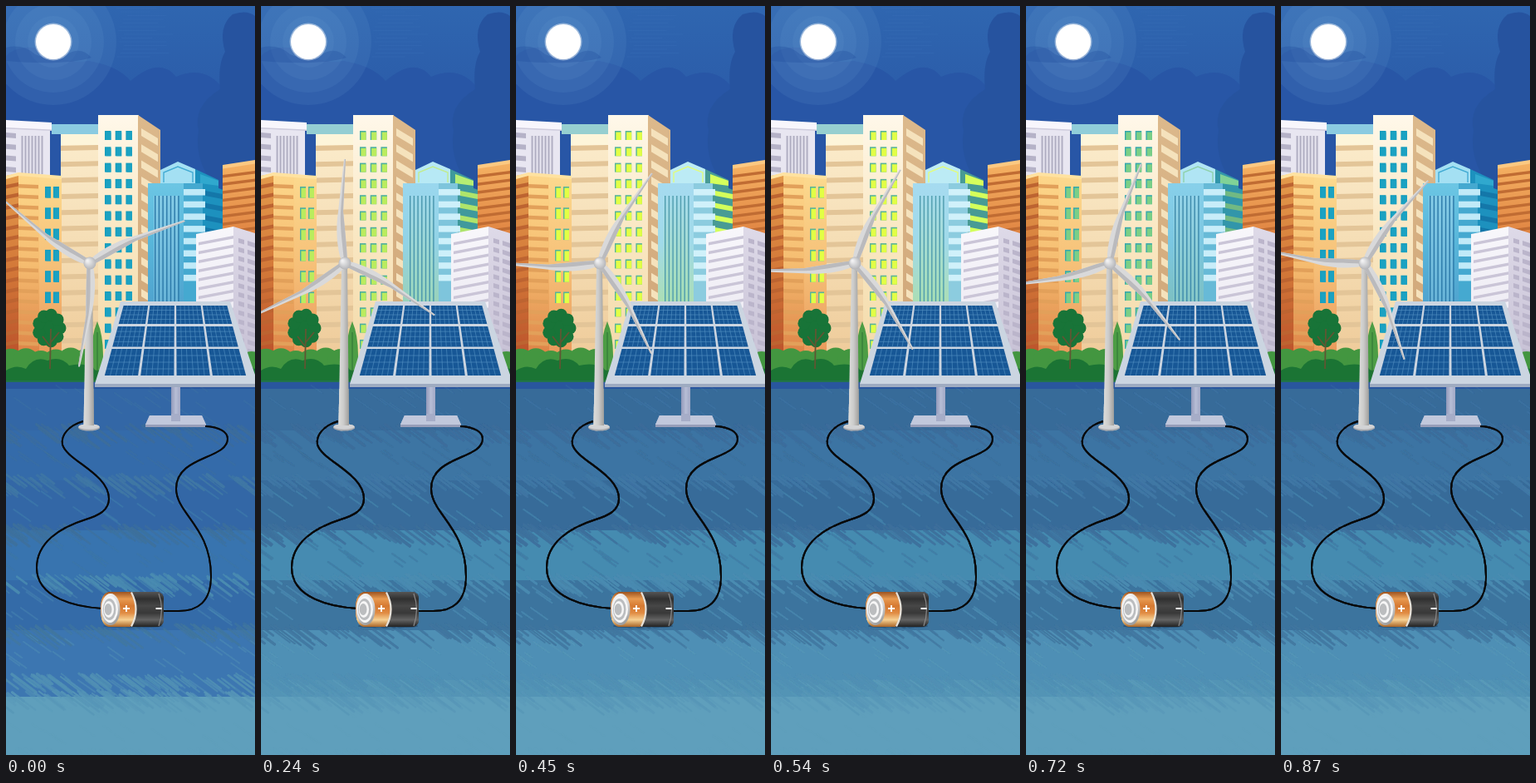
Animation of 300 by 900 pixels, one loop 900 ms. Source, as an HTML page with a canvas:

```html
<!DOCTYPE html>
<html lang="en">
<head>
<meta charset="utf-8">
<title>City power</title>
<style>
html, body { margin: 0; width: 100%; height: 100%; overflow: hidden; background: #2f64ae; }
canvas { display: block; }
</style>
</head>
<body>
<canvas id="stage" width="300" height="900"></canvas>
<script>
const W = 300, H = 900, LOOP = 900, STEP = 30;
const stage = document.getElementById('stage').getContext('2d');
let c = stage;

let seed = 11;
const rnd = () => (seed = (seed * 16807) % 2147483647) / 2147483647;
const lerp = (a, b, k) => a + (b - a) * k;
const clamp = v => Math.min(1, Math.max(0, v));
const times = (n, fn) => { for (let i = 0; i < n; i++) fn(i); };

// Blend two #rrggbb colours
function mix(a, b, k) {
  const part = (s, i) => parseInt(s.substr(1 + i * 2, 2), 16);
  return `rgb(${[0, 1, 2].map(i => Math.round(lerp(part(a, i), part(b, i), k)))})`;
}
function layer(draw) {
  const cv = document.createElement('canvas');
  cv.width = W; cv.height = H;
  c = cv.getContext('2d');
  draw();
  c = stage;
  return cv;
}
function grad(x0, y0, x1, y1, ...cols) {
  const g = c.createLinearGradient(x0, y0, x1, y1);
  cols.forEach((col, i) => g.addColorStop(i / (cols.length - 1), col));
  return g;
}
const vgrad = (y0, y1, ...cols) => grad(0, y0, 0, y1, ...cols);
function rect(x, y, w, h, fill) { c.fillStyle = fill; c.fillRect(x, y, w, h); }
function path(d, fill) { c.fillStyle = fill; c.fill(new Path2D(d)); }
function line(d, col, w) { c.strokeStyle = col; c.lineWidth = w; c.stroke(new Path2D(d)); }
function oval(x, y, rx, ry, fill) {
  c.beginPath();
  c.ellipse(x, y, rx, ry, 0, 0, 7);
  c.fillStyle = fill;
  c.fill();
}
// Upright wall or band with a sloping top and bottom
function slab(x0, x1, y0, y1, h, fill) {
  path(`M${x0} ${y0}L${x1} ${y1}v${h}L${x0} ${y0 + h}Z`, fill);
}
function bands(x0, x1, y0, y1, n, pitch, h, fill) {
  times(n, i => slab(x0, x1, y0 + i * pitch, y1 + i * pitch, h, fill));
}

function sky() {
  rect(0, 0, W, 460, vgrad(0, 220, '#2f66b0', '#2b5ca9', '#24509f'));
  path('M0 60Q15 45 45 52Q70 70 100 66Q135 72 150 90Q185 60 205 85Q240 70 262 100L300 90V230H0Z', '#2856a6');
  path('M262 230Q225 190 232 150Q225 120 258 100Q255 70 264 55Q255 25 273 10Q290 4 300 12V230Z', '#26539f');
  times(14, i => rect(133 + rnd() * 15, 2 + i * 4.5, 35 + rnd() * 30, 1, '#3a70b655'));
  times(4, i => oval(57, 43, 76 - i * 15, 76 - i * 15, '#6aa0d222'));
  path('M0 50Q20 45 35 58Q52 66 74 58Q90 48 103 62Q70 72 0 66Z', '#234f9d55');
  oval(57, 43, 22.5, 22.5, '#ffffff70');
  oval(57, 43, 21, 21, '#fff');
}

function whiteLeft() {
  rect(0, 146, 53, 60, '#e8e6f1');
  bands(0, 12, 152, 153, 4, 13.7, 6, '#b5b2c7');
  times(7, i => rect(18.5 + i * 4, 156, 2, 46, '#b0aec2'));
  slab(0, 55, 137, 140, 9.5, '#f8f6fc');
  slab(0, 55, 146, 148.5, 1.5, '#cecbdc');
}

function creamTower() {
  rect(66, 154, 46, 290, vgrad(154, 430, '#fbeccc', '#f5ddb4', '#eeca98'));
  rect(66, 154, 45, 13, '#fdf5da');
  bands(66, 111, 168, 167, 14, 19.3, 6, '#e3c598');
  rect(111, 131, 49, 300, vgrad(131, 400, '#fff8ea', '#fae8c4', '#f4dcad'));
  slab(159, 186, 131, 149, 270, vgrad(131, 350, '#dcb98c', '#d2aa7c'));
  bands(163, 183, 147, 159, 12, 19.3, 9, '#f5e2bc');
}

function orangeLeft() {
  slab(0, 16, 204, 201, 240, vgrad(204, 430, '#e39a4c', '#d37838', '#b94f2a'));
  rect(15, 202, 26, 240, vgrad(202, 420, '#fdd78b', '#f5bc70', '#dd8246'));
  rect(40, 204, 27, 240, vgrad(204, 420, '#fcd98e', '#f6c078', '#e9985a'));
  bands(0, 15, 215, 212, 17, 12.6, 4.5, '#bd6431');
  bands(15, 39, 214, 215, 17, 12.6, 4.5, '#e2a05a');
  slab(0, 15, 204, 200, 4, '#ffe2a0');
  slab(15, 67, 200, 204, 4, '#ffe2a0');
}

function orangeRight() {
  slab(261, 300, 192, 186, 100, vgrad(188, 280, '#f5b263', '#df8140'));
  bands(261, 300, 203, 198, 9, 9.6, 3.5, '#c06c33');
  slab(261, 300, 191, 185, 4.5, '#fcc982');
}

function whiteRight() {
  slab(229, 274, 274, 265, 160, vgrad(265, 420, '#f8f7fb', '#e9e6f0'));
  slab(274, 300, 265, 273, 165, vgrad(265, 420, '#dedae8', '#c8c2d6'));
  bands(232, 274, 284, 276, 13, 10.8, 3.5, '#cac5d7');
  bands(280, 287, 279, 281, 13, 10.8, 5.5, '#bbb5cb');
  bands(291, 300, 282, 285, 13, 10.8, 5.5, '#bbb5cb');
}

function blueTower(g) {
  const m = (a, b) => mix(a, b, g);
  path('M228 196L256 209V219L262 221V300H228Z', m('#1d91be', '#489b94'));
  path('M234 202L256 210V216L234 213Z', m('#30a8ce', '#d6ff5c'));
  path('M186 197L207 187L228 196V214H186Z', m('#a4e0f3', '#bcebf5'));
  line('M190 212V200L207 193L225 200V212', m('#43abd3', '#e0fc80'), 1.4);
  rect(171, 213, 66, 145, vgrad(213, 356, m('#6cc6e4', '#a6dbf0'), m('#58b6da', '#a0dae9'), m('#50a4cf', '#acdeb4')));
  rect(178, 228, 30, 130, vgrad(228, 356, m('#84cbe6', '#a4dbec'), m('#68b4d8', '#a6deb4')));
  times(7, i => rect(179 + i * 4.7, 228, 1.4, 128, m('#2a78a8', '#4f9cae')));
  rect(214, 213, 23, 143, m('#45a9d0', '#8cccdf'));
  bands(214, 240, 220, 220, 8, 14.7, 7.5, m('#c0eaf8', '#d0f1fa'));
  bands(240, 261, 222, 226, 5, 14.7, 6, m('#1477a9', '#d4ff5b'));
}

function pane(x, y, w, h, g) {
  rect(x, y, w, h, mix('#169dbd', '#58b499', g));
  rect(x + 1.4, y + 1.6, w - 1.4, h - 1.6, mix('#1ba2c2', '#e2ff45', g));
}
function lights(g) {
  blueTower(g);
  rect(55, 142, 56, 12, mix('#8bcbe1', '#96cfd0', g));
  times(14, r => times(3, k => pane(119 + k * 12.7, 150 + r * 19.3, 7.5, 11, g)));
  times(6, r => times(2, k => pane(47 + k * 10, 217 + r * 25.3, 7, 13.5, g)));
}

function plants() {
  times(6, i => oval(6 + i * 18, 430 - rnd() * 4, 16, 16, '#439640'));
  oval(296, 430, 15, 15, '#439640');
  path('M0 438Q12 430 24 436Q34 420 50 426Q66 420 76 432Q92 428 104 434H120V452H0Z', '#1b7434');
  path('M276 451Q288 430 300 436V451Z', '#1b7434');
  path('M110 379Q117 395 117 420Q117 438 110 438Q103 438 103 420Q103 395 110 379Z', '#4d9d45');
  line('M110 392V448', '#2d7135', 1);
  oval(52, 386, 15, 18, '#187438');
  times(9, i => oval(52 + 13 * Math.cos(i * 0.7), 387 + 16 * Math.sin(i * 0.7), 7.5, 7.5, '#187438'));
  line('M53 436L54 388M54 410L44 397M54 404L64 392', '#5f5632', 1.8);
}

// Flat bands of colour whose lower edges run out in slanted brush strokes
function ground() {
  const cols = ['#3d6d9b', '#4178a5', '#3e709c', '#4b8cb1', '#41769f', '#5190b4', '#5796b7', '#5f9fbc'];
  const top = i => 450 + i * 60 - (i > 6 ? 40 : 0);
  c.lineCap = 'round';
  for (let i = cols.length - 1; i >= 0; i--) {
    const y = top(i), end = i < 7 ? top(i + 1) : H;
    rect(0, y, W, end - y, cols[i]);
    times(70, () => {
      const n = 8 + rnd() * 24;
      c.globalAlpha = 0.3 + rnd() * 0.5;
      line(`M${rnd() * 330 - 25} ${end - 8 + rnd() * 8}l${n} ${n * 0.75}`, cols[i], 1.5 + rnd() * 2);
    });
    times(22, () => {
      const n = 8 + rnd() * 22;
      c.globalAlpha = 0.22;
      line(`M${rnd() * 330 - 25} ${lerp(y, end - 20, rnd())}l${n} ${n * 0.7}`, cols[Math.min(7, i + 1)], 2);
    });
  }
  c.globalAlpha = 1;
  c.lineCap = 'butt';
}

function panel() {
  rect(199, 456, 11, 41, grad(199, 0, 210, 0, '#9299ba', '#b6bdd5', '#a2a9c6'));
  path('M173 492H236L241 503H168Z', '#c1c8dc');
  rect(168, 503, 73, 3, '#979eb9');
  rect(199, 490, 11, 9, '#a6adc8');
  path('M138 355H270L301 446V454H107Z', '#cbd5e1');
  rect(107, 454, 194, 4, '#9eabc1');
  // Point on the tilted face: u across, y down the stage
  const pt = (u, y) => `${204 + (u - 0.5) * lerp(127, 174, (y - 360) / 85)} ${y}`;
  times(3, r => {
    const y0 = 360 + r * 24 + r * r, y1 = y0 + 22 + r * r * 2.5;
    times(4, k => {
      const a = k / 4 + 0.009, b = (k + 1) / 4 - 0.009;
      path(`M${pt(a, y0)}L${pt(b, y0)}L${pt(b, y1)}L${pt(a, y1)}Z`, '#175796');
      times(5, i => {
        const u = lerp(a, b, (i + 1) / 6);
        line(`M${pt(u, y0)}L${pt(u, y1)}`, '#5592c3', 0.6);
      });
      times(3, i => {
        const y = lerp(y0, y1, (i + 1) / 4);
        line(`M${pt(a, y)}L${pt(b, y)}`, '#5592c3', 0.6);
      });
    });
  });
}

function battery() {
  oval(153, 745, 36, 2.5, '#24496a55');
  c.beginPath();
  c.roundRect(140, 704, 50, 42, [0, 8, 8, 0]);
  c.fillStyle = vgrad(704, 746, '#555', '#303030', '#474747', '#383838', '#626262', '#222');
  c.fill();
  line('M184 706Q191 725 184 745', '#8a8a8a', 1.2);
  path('M124 704H150Q162 725 150 746H124Q114 744 114 725Q114 706 124 704Z',
    vgrad(704, 746, '#9c5421', '#e89a50', '#d67a32', '#e08b42', '#f6cf91', '#a96528'));
  line('M151 704.5Q162 725 151 745.5', '#e9e3da', 2.2);
  oval(126, 725, 11.5, 19, grad(114, 706, 138, 743, '#fff', '#d5d5d5', '#8d8d8d'));
  times(4, i => oval(125.5 - i * 0.8, 725, 9.5 - i * 1.7, 16 - i * 3, i % 2 ? '#bbbdbf' : '#f6f6f6'));
  line('M141 724H149M145 720V728M180.5 724H187.5', '#fff', 1.8);
}

function wires() {
  line('M93 499C76 504 66 515 68 527C73 546 124 562 124 592C124 606 112 612 96 617C64 627 37 645 37 675C37 712 85 722 116 724', '#080808', 2);
  line('M240 505C258 506 267 512 267 520C267 545 205 540 205 580C205 610 247 626 247 685C247 715 232 728 205 727L190 727', '#080808', 2);
}

function mast() {
  oval(100, 506.5, 13, 4, '#a9abaf');
  oval(100, 505.5, 12.5, 3.2, '#d2d3d5');
  path('M97 312H104L106 504H93.5Z', grad(93, 0, 106, 0, '#dededc', '#cbcbca', '#a09f9c'));
}

function rotor(deg) {
  times(3, k => {
    c.save();
    c.translate(101, 309);
    c.rotate((deg + k * 120) * Math.PI / 180);
    path('M3 -4C18 -10 44 -11 62 -8L125 -1V1L62 -2C42 0 22 2 4 3Z', '#d9d9da');
    path('M4 -1C24 -3 44 -6 62 -5L125 0V1L62 -2C42 0 22 2 4 3Z', '#bababd');
    c.restore();
  });
  const g = c.createRadialGradient(98, 306, 1, 101, 309, 8);
  g.addColorStop(0, '#f1f1f2');
  g.addColorStop(1, '#b1b2b6');
  oval(101, 309, 7.5, 7.5, g);
}

const back = layer(() => {
  sky(); whiteLeft(); creamTower(); orangeLeft();
});
const front = layer(() => {
  orangeRight(); whiteRight(); plants(); ground(); panel(); wires(); battery(); mast();
});

// Rotor starts slowly, runs fast while the lights are on, then slows; degrees per step
function spin(t) {
  const n = t / STEP;
  return 96 + 21.75 * Math.min(n, 8) + 38.6 * clamp((n - 8) / 16) * 16 + 28 * Math.max(0, n - 24);
}
const glow = t => Math.min(clamp(t / 300), clamp((870 - t) / 310));

const start = performance.now();
function frame(now) {
  const t = Math.floor((Math.max(0, now - start) % LOOP) / STEP) * STEP;
  c.drawImage(back, 0, 0);
  lights(glow(t));
  c.drawImage(front, 0, 0);
  rotor(spin(t));
  requestAnimationFrame(frame);
}
frame(start);
</script>
</body>
</html>
```
